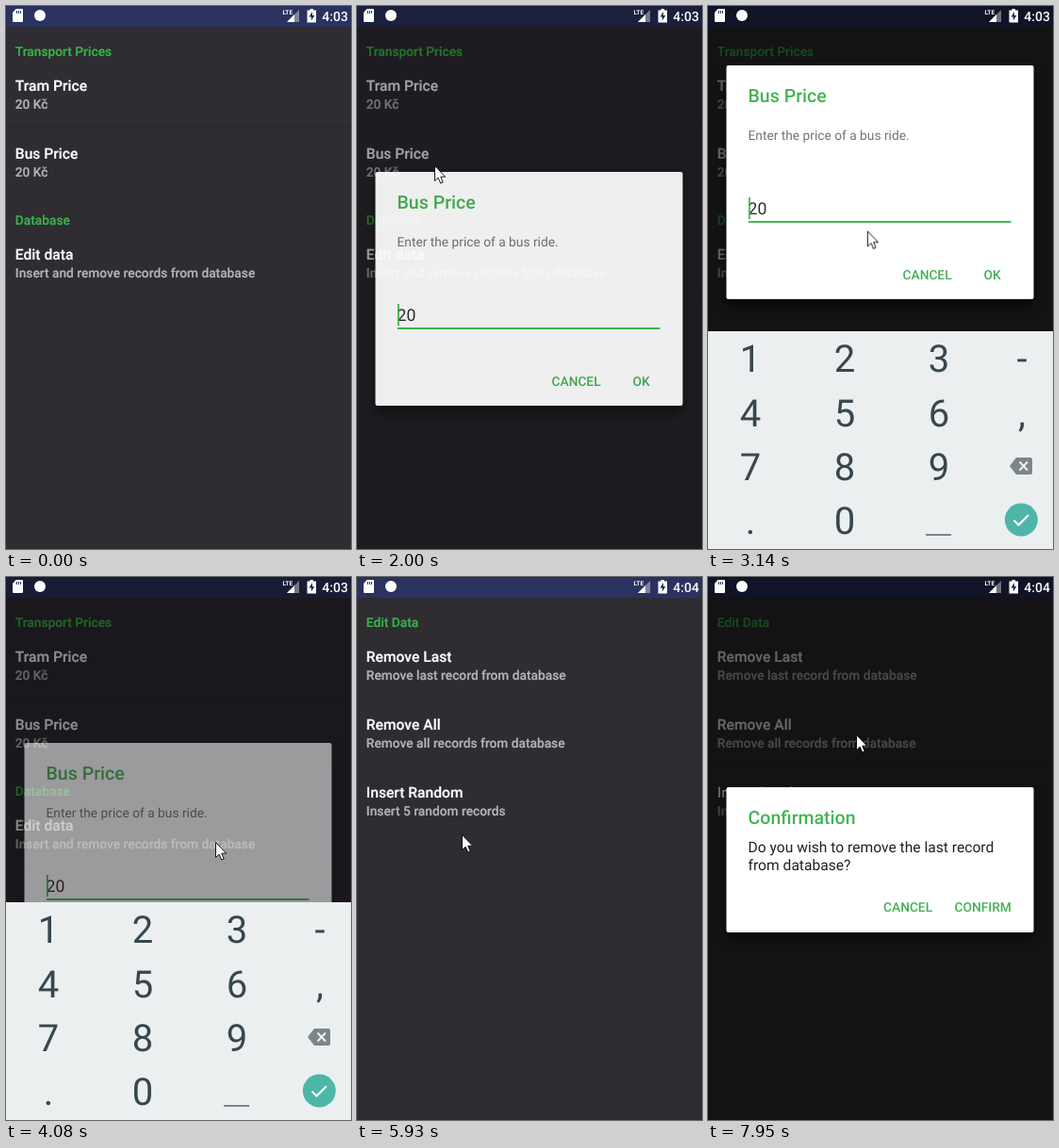
These frames come from a looping animation (366 px wide and 576 px high, 8000 ms). An HTML page:

```html
<!DOCTYPE html>
<html lang="en">
<head>
<meta charset="utf-8">
<title>Price settings</title>
<style>
  html, body { margin: 0; width: 100%; height: 100%; overflow: hidden; background: #2f2c32; }
  svg { display: block; width: 366px; height: 576px; }
  text {
    font-family: Roboto, sans-serif; font-size: 13.75px; white-space: pre;
    text-rendering: geometricPrecision;
  }

  .head, .title, .sub, .action, .caption, .clock { font-weight: 500; }
  .head, .title, .sub { stroke-width: .2px; }
  .head { fill: #38b548; stroke: #38b548; }
  .title { font-size: 15.64px; fill: #fff; stroke: #fff; }
  .sub { fill: #b4b3b6; stroke: #b4b3b6; }
  .rule { stroke: #29272c; }
  .caption { font-size: 19.56px; fill: #45b355; }
  .action { fill: #45b055; }
  .hint { fill: #737373; }
  .value { font-size: 17.6px; fill: #2b2b2b; }
  .message { font-size: 15.64px; fill: #212121; }
  .clock { font-size: 14px; fill: #fff; }
  .keys text { font-size: 40px; fill: #37474f; text-anchor: middle; }
  .card { fill: #fff; filter: drop-shadow(0 8px 6px rgba(0, 0, 0, .5)); }

  .anim { animation: 8s linear infinite; }
  #main { animation-name: main; }
  #edit { animation-name: edit; }
  #dim { animation-name: dim; }
  #price { animation-name: price; }
  #slide { animation-name: slide; }
  #caret { animation-name: caret; animation-timing-function: step-end; }
  #keyboard { animation-name: keyboard; }
  #ripple { animation-name: ripple; }
  #confirm { animation-name: confirm; }
  #before { animation-name: before; animation-timing-function: step-end; }
  #after { animation-name: after; animation-timing-function: step-end; }
  #shown { animation-name: shown; animation-timing-function: step-end; }
  #pointer { animation-name: pointer; }

  @keyframes main { 0%, 65% { opacity: 1 } 68.375%, 100% { opacity: 0 } }
  @keyframes edit { 0%, 65% { opacity: 0 } 68.375%, 100% { opacity: 1 } }
  @keyframes dim {
    0%, 23.625% { opacity: 0 }
    25% { opacity: .36 }
    25.875%, 50% { opacity: .6 }
    51% { opacity: .45 }
    53.25%, 91.8% { opacity: 0 }
    92.75% { opacity: .36 }
    93.625%, 100% { opacity: .6 }
  }
  @keyframes price {
    0%, 23.625% { opacity: 0 }
    25% { opacity: .93 }
    25.875%, 50% { opacity: 1 }
    51% { opacity: .57 }
    52.5%, 100% { opacity: 0 }
  }
  @keyframes slide {
    0%, 28.75% { transform: none; animation-timing-function: ease-out }
    30.4%, 50% { transform: translateY(-113px) }
    50.01%, 100% { transform: none }
  }
  @keyframes caret {
    0% { opacity: 1 }
    28.875% { opacity: 0 }
    35% { opacity: 1 }
    41.25% { opacity: 0 }
    48.125%, 100% { opacity: 1 }
  }
  @keyframes keyboard {
    0%, 28.75% { opacity: 0; transform: translateY(23px) }
    30.625% { opacity: .88; transform: translateY(6px) }
    32%, 51.5% { opacity: 1; transform: none }
    54.25%, 100% { opacity: 0; transform: translateY(23px) }
  }
  @keyframes ripple {
    0%, 88% { opacity: 0; transform: translate(103px, 96px) scale(.05) }
    88.5% { opacity: 1; transform: translate(106px, 95px) scale(.15) }
    90.625%, 91.86% { opacity: 1; transform: translate(120px, 93px) scale(.58) }
    93.625%, 100% { opacity: 0; transform: translate(160px, 93px) scale(1.6) }
  }
  @keyframes confirm {
    0%, 91.8% { opacity: 0 }
    92.75% { opacity: .93 }
    93.625%, 100% { opacity: 1 }
  }
  @keyframes before { 0% { opacity: 1 } 74.125%, 100% { opacity: 0 } }
  @keyframes after { 0% { opacity: 0 } 74.125%, 100% { opacity: 1 } }
  @keyframes shown { 0% { opacity: 0 } 8.5%, 100% { opacity: 1 } }
  @keyframes pointer {
    0%, 8.5% { transform: translate(280px, 540px); animation-timing-function: ease-in-out }
    17.25%, 36.625% { transform: translate(82px, 169px); animation-timing-function: ease-in-out }
    41.25%, 58% { transform: translate(222px, 281px); animation-timing-function: ease-in-out }
    62.5%, 78.25% { transform: translate(111px, 273px); animation-timing-function: ease-in }
    81.75% { transform: translate(142px, 190px); animation-timing-function: ease-out }
    85.625%, 97.875% { transform: translate(103px, 96px) }
    99.375%, 100% { transform: translate(157px, 167px) }
  }
</style>
</head>
<body>
<svg viewBox="0 0 366 576">
  <defs>
    <clipPath id="row"><path d="M0 57H366V129H0Z"/></clipPath>
  </defs>

  <rect width="366" height="576" fill="#2f2c32"/>
  <rect width="366" height="22" fill="#2b325f"/>

  <g id="main" class="anim">
    <path class="rule" d="M0 128.5H366M0 307.5H366"/>
    <text class="head" x="9.8" y="52.5">Transport Prices</text>
    <text class="title" x="9.8" y="90">Tram Price</text>
    <text class="sub" x="9.8" y="108.5">20 Kč</text>
    <text class="title" x="9.8" y="162">Bus Price</text>
    <text class="sub" x="9.8" y="180.5">20 Kč</text>
    <text class="head" x="9.8" y="231.7">Database</text>
    <text class="title" x="9.8" y="269">Edit data</text>
    <text class="sub" x="9.8" y="288">Insert and remove records from database</text>
  </g>

  <g id="edit" class="anim">
    <g clip-path="url(#row)">
      <circle id="ripple" class="anim" r="100" fill="#29272c"/>
    </g>
    <path class="rule" d="M0 128.5H366M0 200.5H366M0 272.5H366"/>
    <text class="head" x="9.8" y="52.5">Edit Data</text>
    <text class="title" x="9.8" y="90">Remove Last</text>
    <text class="sub" x="9.8" y="108.5">Remove last record from database</text>
    <text class="title" x="9.8" y="162">Remove All</text>
    <text class="sub" x="9.8" y="180.5">Remove all records from database</text>
    <text class="title" x="9.8" y="234">Insert Random</text>
    <text class="sub" x="9.8" y="252.5">Insert 5 random records</text>
  </g>

  <rect id="dim" class="anim" width="366" height="576"/>

  <g id="price" class="anim">
    <g id="slide" class="anim">
      <rect class="card" x="19.5" y="176" width="326" height="248" rx="2"/>
      <text class="caption" x="42.5" y="215">Bus Price</text>
      <text class="hint" x="42.5" y="254.5">Enter the price of a bus ride.</text>
      <text class="value" x="42.5" y="334">20</text>
      <rect x="43" y="341" width="278.5" height="2" fill="#45b955"/>
      <rect id="caret" class="anim" x="43" y="316" width="1.8" height="23" fill="#45b955"/>
      <text class="action" x="206.5" y="402.5">CANCEL</text>
      <text class="action" x="292.5" y="402.5">OK</text>
    </g>
  </g>

  <g id="confirm" class="anim">
    <rect class="card" x="19.5" y="223" width="326" height="154" rx="2"/>
    <text class="caption" x="42.5" y="262">Confirmation</text>
    <text class="message" x="42.5" y="292">Do you wish to remove the last record</text>
    <text class="message" x="42.5" y="310.5">from database?</text>
    <text class="action" x="186" y="355">CANCEL</text>
    <text class="action" x="261.5" y="355">CONFIRM</text>
  </g>

  <g id="keyboard" class="anim keys">
    <rect y="345" width="366" height="255" fill="#ebeff0"/>
    <text x="45 145 245 333" y="388">123-</text>
    <text x="45 145 245 333" y="446">456,</text>
    <text x="45 145 245" y="503">789</text>
    <text x="45 145" y="560">.0</text>
    <path d="M231 561H258" stroke="#7c878c" stroke-width="2"/>
    <path d="M320 488L327 479H342Q344 479 344 481V495Q344 497 342 497H327Z" fill="#7b868b"/>
    <path d="M330.5 483.5L339 492.5M339 483.5L330.5 492.5" stroke="#ebeff0" stroke-width="2"/>
    <circle cx="332.3" cy="545" r="17.5" fill="#4db6a9"/>
    <path d="M324.5 545.5L329.5 550.5L340 540" fill="none" stroke="#fff" stroke-width="2"/>
  </g>

  <g fill="#fff">
    <path d="M10.5 3H17Q18 3 18 4V16Q18 17 17 17H8Q7 17 7 16V7Z"/>
    <path d="M11.5 5V8M13.5 5V8M15.5 5V8" stroke="#2b325f"/>
    <circle cx="36" cy="10" r="6"/>
    <path d="M311 4V17H298Z" opacity=".4"/>
    <path d="M306 9V17H298Z"/>
    <text x="293.5" y="9" font-weight="700" style="font-size:6.5px">LTE</text>
    <path d="M322.5 3H326V4.5H329V17.5H319.5V4.5H322.5Z"/>
    <path d="M325 6L321.5 11.5H323.8V15.5L327.3 10H325Z" fill="#20264a"/>
    <text id="before" class="anim clock" x="335.3" y="15.5">4:03</text>
    <text id="after" class="anim clock" x="335.3" y="15.5">4:04</text>
  </g>

  <g id="shown" class="anim">
    <path id="pointer" class="anim" d="M.5 .5V16.5L4.2 13.2L6.7 19L9.2 18L6.8 12.2H11.7Z"
      fill="#fff" stroke="#000" stroke-width=".9"/>
  </g>
</svg>
</body>
</html>
```
